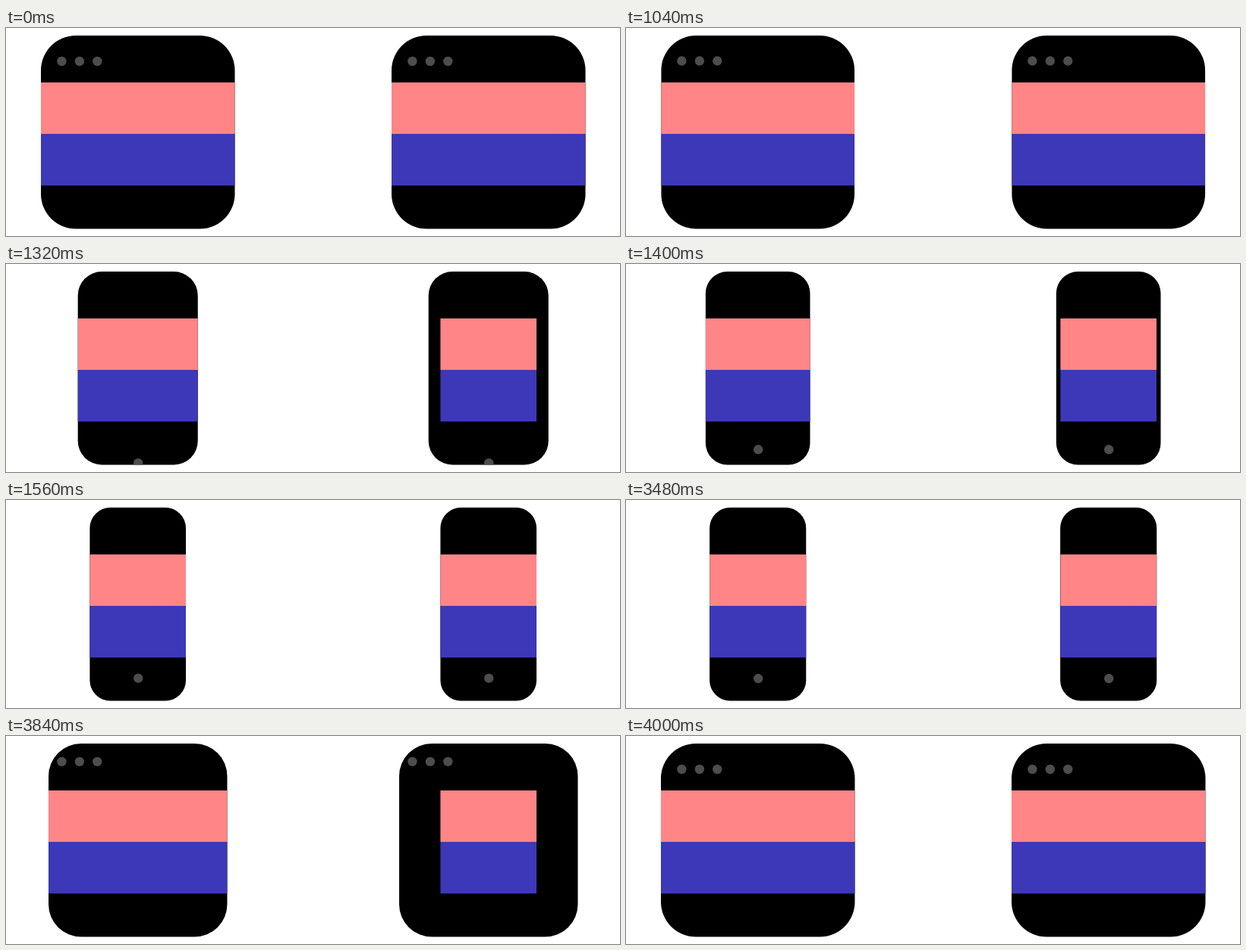
An HTML page with a canvas that plays this animation: 809 by 275 pixels, repeating every 5.04 s.

```html
<!DOCTYPE html>
<html lang="en">
<head>
<meta charset="utf-8">
<title>Responsive and adaptive layout</title>
<style>
  html, body { margin: 0; width: 100%; height: 100%; overflow: hidden; background: #fff; }
  canvas { display: block; width: 809px; height: 275px; }
</style>
</head>
<body>
<canvas id="stage" width="809" height="275"></canvas>
<script>
const ctx = document.getElementById('stage').getContext('2d');
const LOOP = 5040, STEP = 40, SPAN = 560;
const TOP = 10, SIZE = 255.5;
const WIDE = { x: 46, w: SIZE, r: 46 };
const NARROW = { x: 110.4, w: 126.6, r: 27 };
const GAP = 462;

const mix = (a, b, p) => a + (b - a) * p;
const clamp = v => Math.min(1, Math.max(0, v));

// cubic-bezier(.53, 0, .333, 1)
function ease(x) {
  if (x <= 0 || x >= 1) return clamp(x);
  let lo = 0, hi = 1, s = 0.5;
  for (let i = 0; i < 30; i++) {
    s = (lo + hi) / 2;
    const q = 1 - s;
    if (3 * 0.53 * s * q * q + 3 * 0.333 * s * s * q + s * s * s < x) lo = s;
    else hi = s;
  }
  return s * s * (3 - 2 * s);
}

// 0 = wide window, 1 = phone; the way back mirrors the way there
function phase(t) {
  const there = (t - 1000) / SPAN, back = (4000 - t) / SPAN;
  return ease(clamp(Math.min(there, back)));
}

function dot(x, y) {
  ctx.beginPath();
  ctx.arc(x, y, 6.2, 0, Math.PI * 2);
  ctx.fill();
}

function stripes(x, w) {
  ctx.fillStyle = '#ff8587';
  ctx.fillRect(x, 72, w, 68);
  ctx.fillStyle = '#3c38b8';
  ctx.fillRect(x, 140, w, 68.3);
}

function device(dx, p, adaptive) {
  const x = mix(WIDE.x, NARROW.x, p);
  const w = mix(WIDE.w, NARROW.w, p);
  ctx.save();
  ctx.translate(dx, 0);

  const body = new Path2D();
  body.roundRect(x, TOP, w, SIZE, mix(WIDE.r, NARROW.r, p));
  ctx.fillStyle = '#000';
  ctx.fill(body);

  if (adaptive && p > 0.02) stripes(NARROW.x, NARROW.w);
  else stripes(x, w);

  ctx.clip(body);
  ctx.fillStyle = '#4d4d4d';
  for (let i = 0; i < 3; i++) dot(73.4 + 23.45 * i, 44 - 65 * p);
  dot(174.2, 235.6 + 113 * (1 - p));
  ctx.restore();
}

function draw(now) {
  const t = Math.floor((now % LOOP) / STEP) * STEP;
  const p = phase(t);
  ctx.fillStyle = '#fff';
  ctx.fillRect(0, 0, 809, 275);
  device(0, p, false);
  device(GAP, p, true);
}

const start = performance.now();
function tick() {
  draw(performance.now() - start);
  requestAnimationFrame(tick);
}
tick();
</script>
</body>
</html>
```
